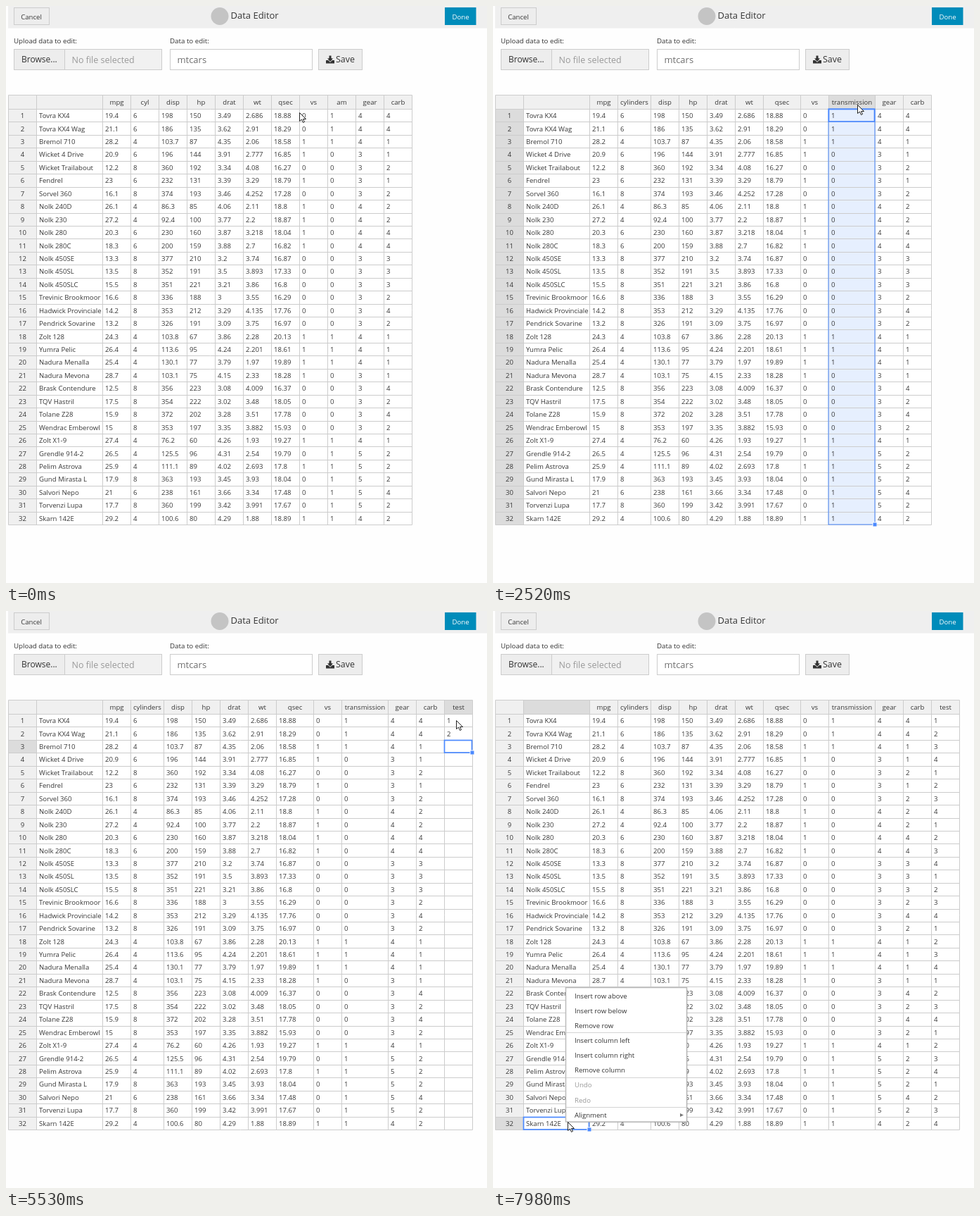
Animation, 684 px wide and 819 px high, one loop 8 s. Source, as an HTML page with a canvas:

```html
<!DOCTYPE html>
<html lang="en">
<head>
<meta charset="utf-8">
<title>Data Editor</title>
<style>
html, body { margin: 0; width: 100%; height: 100%; overflow: hidden; background: #fefefe; }
canvas { display: block; width: 684px; height: 819px; }
</style>
</head>
<body>
<canvas id="stage" width="684" height="819"></canvas>
<script>
const g = document.getElementById('stage').getContext('2d');
const LOOP = 8000, STEP = 70;
const BLUE = '#4b89ff', LINE = '#ccc', INK = '#373737';
const TOP = 126.5, HEAD = 146.5, ROWS = 32, ROW = 590 / ROWS;
const CYL = 2, QSEC = 7, AM = 9, CARB = 11, TEST = 12;

const names = `Tovra KX4,Tovra KX4 Wag,Bremol 710,Wicket 4 Drive,Wicket Trailabout,Fendrel,Sorvel 360,
Nolk 240D,Nolk 230,Nolk 280,Nolk 280C,Nolk 450SE,Nolk 450SL,Nolk 450SLC,Trevinic Brookmoor,
Hadwick Provinciale,Pendrick Sovarine,Zolt 128,Yumra Pelic,Nadura Menalla,Nadura Mevona,
Brask Contendure,TQV Hastril,Tolane Z28,Wendrac Emberowl,Zolt X1-9,Grendle 914-2,Pelim Astrova,
Gund Mirasta L,Salvori Nepo,Torvenzi Lupa,Skarn 142E`.split(',').map(s => s.trim());

const within = (t, a, b) => t >= a && t < b;
const clamp = (v, a, b) => Math.min(b, Math.max(a, v));
const random = (r, c) => Math.abs(Math.sin(r * 12.99 + c * 78.23) * 43758.55) % 1;

function cylinders(r) {
  if (r === 4 || r === 6 || within(r, 11, 17) || within(r, 21, 25) || r === 28 || r === 30) return 8;
  if (r === 2 || within(r, 7, 9) || within(r, 17, 21) || within(r, 25, 28) || r === 31) return 4;
  return 6;
}

// Figures follow the cylinder count, with seeded scatter
function makeRow(name, r) {
  const cyl = cylinders(r), size = (cyl - 4) / 2;
  const near = (c, mid, spread, digits) => +(mid + (random(r, c) - 0.5) * spread).toFixed(digits);
  const manual = r < 3 || within(r, 17, 20) || r > 24;
  const straight = cyl < 8 && r > 1 && r !== 26 && r !== 29;
  const gear = manual ? (within(r, 26, 31) ? 5 : 4) : (within(r, 7, 11) ? 4 : 3);
  const carb = cyl === 8 ? (within(r, 11, 14) ? 3 : r % 2 ? 4 : 2) : cyl === 6 ? (straight && gear === 3 ? 1 : 4)
    : (manual && r < 26 || gear === 3 ? 1 : 2);
  return [name, near(1, 26.5 - 5.7 * size, 6, 1), cyl, near(3, 105 + 85 * size + 20 * size * size, 60, cyl === 4 ? 1 : 0),
    near(4, 80 + 63 * size, 40, 0), near(5, 4.05 - 0.4 * size, 0.6, 2), near(6, 2.3 + 0.8 * size, 0.9, r % 3 ? 2 : 3),
    near(7, 19 - size, 2.5, 2), +straight, +manual, gear, carb];
}
const table = names.map(makeRow);

// Times of the user's actions, in ms
const RESIZED = 560, CYL_SET = 1780, AM_SET = 2470, INSERTED = 4340, TEST_SET = 5050, FILLED = 7300;
const TAPS = [910, 1790, 1930, 2790, 4300, 4600, 5180, 7830];
const DRAGS = [[280, RESIZED], [6000, 6250], [6470, FILLED]];
const digitTime = i => 5300 + i * 150;
const EDITS = [
  { col: CYL, from: 980, to: CYL_SET, type: 1090, gap: 50, old: 'cyl', text: 'cylinders' },
  { col: AM, from: 1950, to: AM_SET, type: 2100, gap: 26, old: 'am', text: 'transmission' },
  { col: TEST, from: 4620, to: TEST_SET, type: 4760, gap: 60, old: 'V1', text: 'test' }
];
// Pointer moves: start, end, x, y
const MOVES = [[70, 200, 417, 137], [280, 540, 430, 137], [600, 850, 201, 137], [1400, 1720, 492, 135],
  [2450, 2750, 603, 157], [2890, 3150, 576, 165], [3230, 4130, 500, 255], [4350, 4550, 649, 142],
  [5040, 5160, 640, 155], [6010, 6240, 645, 212], [6250, 6400, 662, 220], [6480, 6930, 643, 520],
  [6930, 7250, 643, 730], [7330, 7820, 106, 725]];
const MENU = ['Insert row above', 'Insert row below', 'Remove row', 'Insert column left',
  'Insert column right', 'Remove column', 'Undo', 'Redo', 'Alignment'];
const ITEM = 21.1;

function mouse(t) {
  let x = 417, y = 151;
  for (const [from, to, toX, toY] of MOVES) {
    const k = clamp((t - from) / (to - from), 0, 1);
    x += (toX - x) * k;
    y += (toY - y) * k;
  }
  return [x, y];
}

const rowAt = y => clamp(Math.floor((y - HEAD) / ROW), 0, ROWS - 1);
const rowY = r => Math.round(HEAD + r * ROW - 0.5) + 0.5;
const rowMid = r => HEAD + (r + 0.5) * ROW;

function box(x, y, w, h, fill, stroke, lw = 1) {
  if (fill) { g.fillStyle = fill; g.fillRect(x, y, w, h); }
  if (stroke) { g.strokeStyle = stroke; g.lineWidth = lw; g.strokeRect(x, y, w, h); }
}

function line(x1, y1, x2, y2, color = LINE) {
  g.strokeStyle = color;
  g.lineWidth = 1;
  g.beginPath();
  g.moveTo(x1, y1);
  g.lineTo(x2, y2);
  g.stroke();
}

function write(s, x, y, { size = 9.6, color = INK, align = 'left' } = {}) {
  g.font = `${size}px "Open Sans", sans-serif`;
  g.fillStyle = color;
  g.textAlign = align;
  g.fillText(s, x, y + size * 0.36);
}

function disc(x, y, r, fill) {
  g.fillStyle = fill;
  g.beginPath();
  g.arc(x, y, r, 0, 7);
  g.fill();
}

function shape(points, fill, stroke) {
  g.beginPath();
  points.forEach(([x, y]) => g.lineTo(x, y));
  g.closePath();
  g.fillStyle = fill;
  g.fill();
  if (stroke) { g.strokeStyle = stroke; g.lineWidth = 1; g.stroke(); }
}

function drawPage() {
  box(0, 0, 684, 819, '#fefefe');
  box(3, 0, 681, 31, '#efefef');
  line(3, 31.5, 684, 31.5, '#f6f6f6');
  box(11.5, 2.5, 50, 24, '#ededed', '#ccc');
  write('Cancel', 36, 15.5, { align: 'center' });
  disc(304, 14.5, 12.5, '#c4c4c4');
  write('Data Editor', 319.5, 13.7, { size: 13 });
  box(624, 2, 44.5, 25, '#008cba');
  write('Done', 646.5, 15.5, { color: '#fff', align: 'center' });

  write('Upload data to edit:', 11, 49.5, { size: 9.75, color: '#333' });
  write('Data to edit:', 233, 49.5, { size: 9.75, color: '#333' });
  box(11.5, 61.5, 210, 29, '#f1f1f1', '#ccc');
  box(11.5, 61.5, 72, 29, '#ededed', '#ccc');
  write('Browse...', 22, 76, { size: 12, color: '#333' });
  write('No file selected', 93.5, 76, { size: 12.5, color: '#999' });
  box(233.5, 61.5, 202, 29, '#fff', '#ccc');
  write('mtcars', 243.5, 76, { size: 13, color: '#6f6f6f' });
  box(444.5, 61.5, 62, 29, '#ededed', '#ccc');
  write('Save', 469, 76, { size: 12.4, color: '#333' });

  box(455, 77, 12, 4.5, '#333');
  shape([[459, 70], [463, 70], [463, 74], [466, 74], [461, 79.5], [456, 74], [459, 74]], '#333', '#ededed');
}

function columns(t) {
  const heads = ['', 'mpg', t < CYL_SET ? 'cyl' : 'cylinders', 'disp', 'hp', 'drat', 'wt', 'qsec', 'vs',
    t < AM_SET ? 'am' : 'transmission', 'gear', 'carb'];
  if (t >= INSERTED) heads.push(t < TEST_SET ? 'V1' : 'test');
  let x = 43.5;
  return heads.map((name, i) => {
    let w = 40;
    if (i === 0) w = 94;
    if (i === CYL && t >= CYL_SET) w = 47;
    if (i === QSEC && t >= RESIZED) w = 53;
    if (i === AM && t >= AM_SET) w = 66;
    const col = { name, x, w };
    x += w;
    return col;
  });
}

function selection(t) {
  const last = ROWS - 1;
  if (within(t, 910, CYL_SET)) return { col: CYL, from: 0, to: last };
  if (within(t, CYL_SET, 2790)) return { col: AM, from: 0, to: last };
  if (within(t, 2790, INSERTED)) return { col: CARB, from: 0, to: 0 };
  if (within(t, 5200, 6000)) {
    const r = clamp(Math.floor((t - digitTime(0) - 60) / 150) + 1, 0, 4);
    return { col: TEST, from: r, to: r };
  }
  if (within(t, 6000, 6470)) return { col: TEST, from: 0, to: rowAt(mouse(Math.min(t, 6240))[1]) };
  if (within(t, 6470, FILLED)) return { col: TEST, from: 0, to: 3 };
  if (within(t, FILLED, 7840)) return { col: TEST, from: 0, to: last };
  if (t >= 7840) return { col: 0, from: last, to: last };
  return null;
}

function testValue(r, t) {
  if (t >= FILLED) return r % 4 + 1;
  return r < 4 && t >= digitTime(r) ? r + 1 : '';
}

function drawTable(t, cols, sel) {
  const last = cols[cols.length - 1], right = last.x + last.w, bottom = rowY(ROWS);
  box(3.5, TOP, right - 3.5, bottom - TOP, '#fff');
  box(3.5, TOP, right - 3.5, HEAD - TOP, '#f0f0f0');
  box(3.5, HEAD, 40, bottom - HEAD, '#f0f0f0');
  if (sel) {
    const c = cols[sel.col], y = rowY(sel.from), h = rowY(sel.to + 1) - y;
    box(c.x, TOP, c.w, HEAD - TOP, '#dcdcdc');
    box(3.5, y, 40, h, '#dcdcdc');
    if (sel.to > sel.from) box(c.x, y, c.w, h, '#e6effe');
  }
  line(3.5, TOP, right, TOP);
  line(3.5, TOP, 3.5, bottom);
  line(43.5, TOP, 43.5, bottom);
  for (let r = 0; r <= ROWS; r++) line(3.5, rowY(r), right, rowY(r));
  cols.forEach((c, i) => {
    line(c.x + c.w, TOP, c.x + c.w, bottom);
    write(c.name, c.x + c.w / 2, 137, { align: 'center' });
    table.forEach((row, r) => write(i === TEST ? testValue(r, t) : row[i], c.x + 3.5, rowMid(r)));
  });
  for (let r = 0; r < ROWS; r++) write(r + 1, 23.5, rowMid(r), { align: 'center' });
}

function drawSelection(t, cols, sel) {
  if (!sel) return;
  const { w } = cols[sel.col], x = cols[sel.col].x - 0.5;
  const y = rowY(sel.from) - 0.5, end = rowY(sel.to + 1) - 0.5;
  if (within(t, 6520, FILLED)) {
    const to = Math.max(3, rowAt(mouse(t - 50)[1]));
    box(x - 0.5, y, w, rowY(to + 1) - y, null, '#f33');
  }
  if (sel.to > sel.from) box(x, y, w, end - y, null, BLUE);
  box(x + 0.5, y + 0.5, w - 1, rowY(sel.from + 1) - y - 1, null, BLUE, 1.7);
  box(x + w - 3.5, end - 3.5, 6, 6, '#fff');
  box(x + w - 2.5, end - 2.5, 5, 5, BLUE);
}

function drawEditor(t, cols) {
  const e = EDITS.find(d => within(t, d.from, d.to));
  if (!e) return;
  const x = cols[e.col].x, w = 37, mid = x + w / 2;
  const count = clamp(Math.floor((t - e.type) / e.gap) + 1, 0, e.text.length);
  const s = count ? e.text.slice(0, count) : e.old;
  g.font = '13px "Open Sans", sans-serif';
  const tw = g.measureText(s).width;
  const left = tw > w - 6 ? x + w - 4 - tw : mid - tw / 2;
  g.save();
  g.beginPath();
  g.roundRect(x + 0.5, TOP, w - 1, 17.5, 2);
  g.fillStyle = '#fff';
  g.fill();
  g.clip();
  if (!count) box(left, TOP + 2, tw, 14, '#1e80e8');
  write(s, left, 135.5, { size: 13, color: count ? '#222' : '#fff' });
  if (count) line(left + tw + 0.5, TOP + 3, left + tw + 0.5, TOP + 15, '#222');
  g.restore();
  g.beginPath();
  g.roundRect(x + 0.5, TOP, w - 1, 17.5, 2);
  g.strokeStyle = '#000';
  g.lineWidth = 2;
  g.stroke();
}

function drawResizer(t) {
  if (!within(t, 200, RESIZED)) return;
  const x = mouse(t)[0];
  box(x - 3, TOP, 5, HEAD - TOP, '#34a9db');
  if (t < DRAGS[0][0]) return;
  g.setLineDash([3, 2]);
  line(x + 0.5, HEAD, x + 0.5, rowY(ROWS), '#777');
  g.setLineDash([]);
}

function drawMenu(x, y, t) {
  box(x + 2, y + 2, 172, 191, 'rgba(0,0,0,.08)');
  box(x + 0.5, y + 0.5, 172, 190.5, '#fff', '#bbb', 1.5);
  const [mx, my] = mouse(t);
  const hover = Math.floor((my - y - 2) / ITEM);
  if (mx > x + 4 && within(hover, 0, 6)) box(x + 2, y + 2 + hover * ITEM, 169, ITEM, '#f3f3f3');
  MENU.forEach((item, i) => {
    const off = i === 6 || i === 7;
    write(item, x + 13, y + 12.4 + i * ITEM, { color: off ? '#999' : '#333' });
  });
  for (const i of [3, 6, 8]) {
    const sy = Math.round(y + 1 + i * ITEM) + 0.5;
    line(x + 1, sy, x + 172, sy, '#d4d4d4');
  }
  shape([[x + 163, y + 179], [x + 168, y + 181.5], [x + 163, y + 184]], '#777');
}

function drawPointer(t) {
  const [x, y] = mouse(t).map(Math.round);
  const editing = EDITS.some(e => within(t, e.from, e.to)) && y > TOP && y < HEAD;
  const pressed = TAPS.some(a => within(t, a, a + 120)) || DRAGS.some(([a, b]) => within(t, a, b));
  if (pressed) disc(x, y, 9.5, 'rgba(250,225,0,.65)');
  g.save();
  g.translate(x + 0.5, y + 0.5);
  if (within(t, 200, RESIZED)) {
    line(-1, -6, -1, 6, '#000');
    line(2, -6, 2, 6, '#000');
    shape([[-8, 0], [-4, -3], [-4, 3]], '#000');
    shape([[9, 0], [5, -3], [5, 3]], '#000');
  } else if (editing) {
    line(0, -6, 0, 7, '#555');
    line(-3, -6.5, 3, -6.5, '#555');
    line(-3, 7.5, 3, 7.5, '#555');
  } else if (within(t, 2940, INSERTED)) {
    shape([[-1, 0], [1, 0], [2, 1], [2, 6], [5, 6], [8, 8], [8, 12], [6, 16], [0, 16], [-5, 10],
      [-4, 8], [-1, 10], [-2, 1]], '#fff', '#222');
    line(4, 7, 4, 10, '#222');
    line(6, 8, 6, 10, '#222');
  } else {
    shape([[0, 0], [0, 12], [3, 9.5], [5, 14], [7, 13], [5, 9], [9, 9]], '#fff', '#222');
  }
  g.restore();
}

function draw(t) {
  const cols = columns(t), sel = selection(t);
  drawPage();
  drawTable(t, cols, sel);
  drawSelection(t, cols, sel);
  drawEditor(t, cols);
  drawResizer(t);
  if (within(t, 2870, INSERTED)) drawMenu(431, 157, t);
  if (t >= 7900) drawMenu(103, 534, t);
  drawPointer(t);
}

function tick() {
  const t = performance.now() % LOOP;
  draw(Math.floor(t / STEP) * STEP);
  requestAnimationFrame(tick);
}
tick();
</script>
</body>
</html>
```
